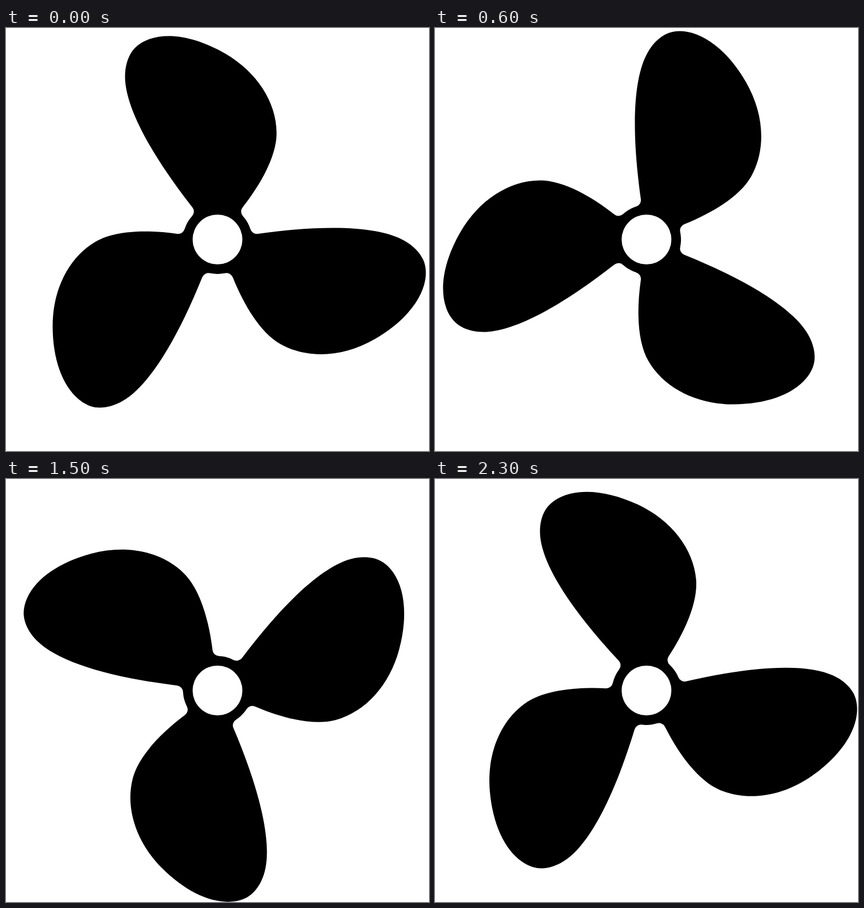
Write an HTML page that moves like this. It is 748 by 748 pixels and loops after 2.4 s.

```html
<!DOCTYPE html>
<html lang="en">
<head>
<meta charset="utf-8">
<title>Propeller</title>
<style>
  html, body { margin: 0; width: 100%; height: 100%; overflow: hidden; background: #fff; }
  svg { display: block; width: 100%; height: 100%; }
</style>
</head>
<body>
<svg viewBox="-374 -374 748 748">
  <g id="fan">
    <circle r="61"/>
    <path id="blade"/>
    <use href="#blade" transform="rotate(120)"/>
    <use href="#blade" transform="rotate(240)"/>
  </g>
  <circle r="44" fill="#fff"/>
</svg>
<script>
const HUB = 61, FILLET = 12, AXIS = 270, HALF_NECK = 38;
const rad = Math.PI / 180;
const polar = (r, deg) => [r * Math.cos(deg * rad), r * Math.sin(deg * rad)];
const cross = (a, b) => a[0] * b[1] - a[1] * b[0];
const point = (x, y, heading) => ({ pos: [x, y], heading });

// The neck edges are radial; fillets of fixed radius join them to the hub
const reach = HUB + FILLET;
const neckRadius = Math.sqrt(reach ** 2 - FILLET ** 2);
const hubAngle = HALF_NECK + Math.asin(FILLET / reach) / rad;
const neck = side => polar(neckRadius, AXIS + side * HALF_NECK);
const hub = side => polar(HUB, AXIS + side * hubAngle);
const fillet = end => `A${FILLET},${FILLET} 0 0 0 ${end}`;

// Elliptic arc through two points, tangent to both headings
function arc(a, b) {
  const u = polar(1, a.heading), v = polar(1, b.heading);
  const d = [b.pos[0] - a.pos[0], b.pos[1] - a.pos[1]];
  const turn = (b.heading - a.heading) * rad;
  const k = 4 / 3 * Math.tan(turn / 4) / Math.tan(turn / 2) / cross(u, v);
  const s = k * cross(d, v), w = k * cross(u, d);
  return `C${a.pos[0] + s * u[0]},${a.pos[1] + s * u[1]} ` +
         `${b.pos[0] - w * v[0]},${b.pos[1] - w * v[1]} ${b.pos}`;
}

// Position and heading, clockwise around the blade
const outline = [
  point(...neck(-1), AXIS - HALF_NECK),
  point(-163.5, -288, 270),
  point(-151, -332.7, 305),
  point(-121.4, -354, 340),
  point(13.2, -329, 390),
  point(104.5, -188, 450),
  point(...neck(1), AXIS + HALF_NECK + 180)
];

document.getElementById("blade").setAttribute("d",
  `M0,0L${hub(-1)}` + fillet(neck(-1)) +
  outline.slice(1).map((p, i) => arc(outline[i], p)).join("") +
  fillet(hub(1)) + "Z");

// 24 steps of 5 degrees bring each blade to the place of the next
const fan = document.getElementById("fan");
function draw() {
  const step = Math.floor(performance.now() / 100) % 24;
  fan.setAttribute("transform", `rotate(${step * 5})`);
  requestAnimationFrame(draw);
}
draw();
</script>
</body>
</html>
```
